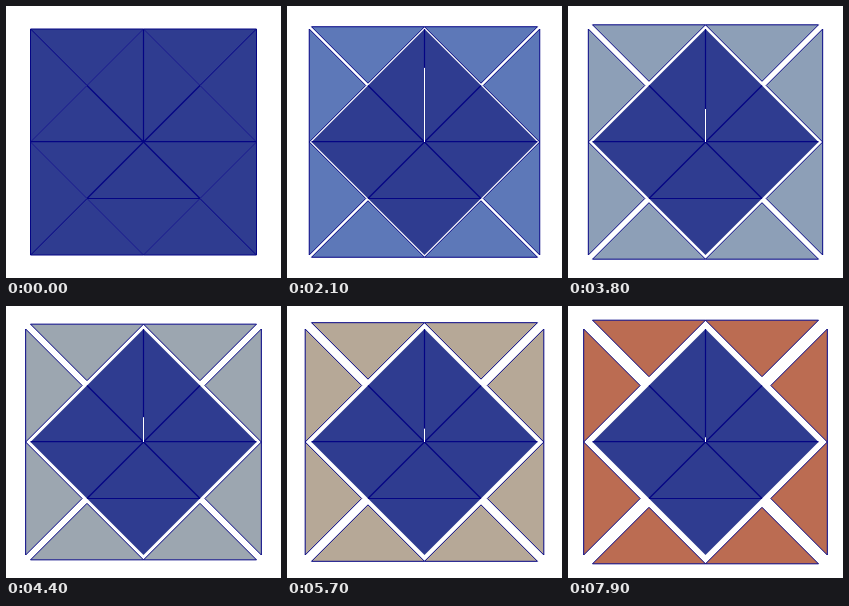
These frames come from a looping animation (275x272 px, 8000 ms). An HTML page with a canvas:

```html
<!DOCTYPE html>
<html lang="en">
<head>
<meta charset="utf-8">
<title>Opening square</title>
<style>
  html, body { margin: 0; width: 100%; height: 100%; overflow: hidden; background: #fff; }
  canvas { display: block; }
</style>
</head>
<body>
<canvas id="stage" width="275" height="272"></canvas>
<script>
const canvas = document.getElementById('stage');
const ctx = canvas.getContext('2d');
const LOOP = 8000, STEP = 100;
const CX = 137.5, CY = 136, HALF = 113;
const EDGE = 'rgb(4,4,132)';

const cubic = (u, a, b, c, d) => a + u * (b + u * (c + u * d));

// Smooth diverging colour scale: blue through grey to red.
function scaleColor(u) {
  const r = cubic(u, 47, 162, 446, -542);
  const g = cubic(u, 60, 301, 99, -520);
  const b = cubic(u, 144, 325, -661, 182);
  return `rgb(${[r, g, b].map(Math.round)})`;
}

// Points are in units of half the square, measured from its centre.
function trace(points, dx = 0, dy = 0) {
  ctx.beginPath();
  for (const [x, y] of points) ctx.lineTo(CX + x * HALF + dx, CY + y * HALF + dy);
}

function line(from, to, dy = 0) {
  trace([from, to], 0, dy);
  ctx.stroke();
}

function drawDiamond(step) {
  trace([[0, -1], [1, 0], [0, 1], [-1, 0]]);
  ctx.fillStyle = scaleColor(0);
  ctx.fill();
  ctx.strokeStyle = EDGE;
  ctx.lineWidth = 1.2;
  line([-0.5, -0.5], [0.5, 0.5]);
  line([0.5, -0.5], [-0.5, 0.5]);
  line([-1, 0], [1, 0], -0.4);
  line([-0.5, 0.5], [0.5, 0.5]);
  line([0, -1], [0, 0]);
  if (step > 0) {
    // The white slit closes towards the centre.
    const slit = Math.min(1, 1.7 * Math.exp(-step / 21));
    ctx.strokeStyle = '#fff';
    ctx.lineWidth = 1;
    line([0, -slit], [0, 0]);
  }
}

function drawTriangles(step) {
  const u = step / 100;
  const shift = u * HALF / 10;
  ctx.fillStyle = scaleColor(u);
  ctx.strokeStyle = EDGE;
  ctx.lineWidth = 1;
  ctx.lineJoin = 'bevel';
  for (const sx of [-1, 1]) {
    for (const sy of [-1, 1]) {
      for (const [mx, my] of [[0, sy], [sx, 0]]) {
        trace([[sx, sy], [mx, my], [sx / 2, sy / 2]], mx * shift, my * shift);
        ctx.closePath();
        ctx.fill();
        ctx.stroke();
      }
    }
  }
}

function draw(time) {
  const step = Math.max(0, Math.floor((time % LOOP) / STEP) - 1);
  ctx.fillStyle = '#fff';
  ctx.fillRect(0, 0, canvas.width, canvas.height);
  drawDiamond(step);
  drawTriangles(step);
}

const start = performance.now();
function tick() {
  draw(performance.now() - start);
  requestAnimationFrame(tick);
}
tick();
</script>
</body>
</html>
```
